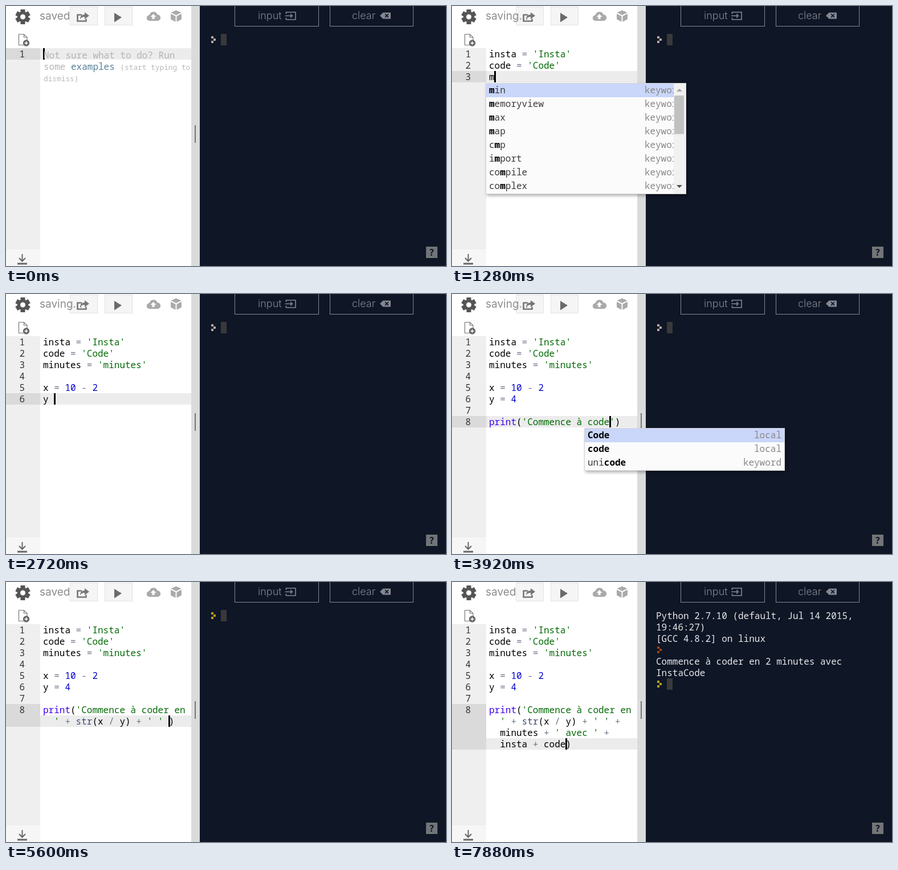
These frames come from a looping animation (772 by 456 pixels, 8 s). An HTML page with a canvas:

```html
<!DOCTYPE html>
<html lang="en">
<head>
<meta charset="utf-8">
<title>Code editor</title>
<style>
  html, body { margin: 0; width: 100%; height: 100%; overflow: hidden; background: #fff; }
  canvas { display: block; }
</style>
</head>
<body>
<canvas id="stage" width="772" height="456"></canvas>
<script>
const ctx = document.getElementById('stage').getContext('2d');
const LOOP = 8000, TICK = 40;
const CHAR = 9.6, LINE = 20, TEXT_X = 65, TOP = 74, WRAP = 27, INDENT = 2;
const MONO = '"Noto Sans Mono", "DejaVu Sans Mono", monospace';
const SANS = 'Inter, Lato, sans-serif';

const KEYS = "insta = 'Insta'\ncode = 'Code'\nminutes = 'minutes'\n\nx = 10 - 2\ny = 4\n\n" +
  "print('Commence à coder en ' + str(x / y) + ' ' + minutes + ' avec ' + insta + code";

// [key index, time it is pressed]; keys in between are evenly spaced
const PACE = [[0, 40], [14, 800], [16, 880], [30, 1280], [31, 1360], [41, 1680], [60, 2480],
  [61, 2600], [63, 2720], [64, 2780], [75, 3360], [76, 3440], [90, 3920], [93, 4080],
  [96, 4280], [108, 5040], [109, 5160], [116, 5560], [117, 5680], [125, 5960], [126, 6080],
  [135, 6600], [136, 6680], [140, 6860], [141, 6920], [151, 7400]];
const RUN = 7480, BANNER = 7560, RESULT = 7640;
const FIRST_POPUP_OVER_PROMPT = 100;

const KEYWORDS = ('zip xrange with while vars unichr type tuple try super str staticmethod sorted ' +
  'slice setattr set round return reversed reload reduce range raise property print pow pass ord ' +
  'or open object not next min memoryview max map long locals list len iter issubclass ' +
  'isinstance is int input in cmp import if id hex help hash globals from frozenset format for ' +
  'float finally filter file execfile exec except eval enumerate else elif divmod dir dict delattr ' +
  'del def continue compile complex coerce classmethod class chr callable bytearray buffer bool ' +
  'bin basestring assert as any and all abs unicode sum lambda raw_input itemgetter __import__').split(' ');

const COLORS = { string: '#036a07', number: '#0000cd', operator: '#687687',
  print: '#3d00f0', str: '#3c4c72', plain: '#000' };

function rect(color, x, y, w, h) {
  ctx.fillStyle = color;
  ctx.fillRect(x, y, w, h);
}
function frame(color, x, y, w, h) {
  ctx.strokeStyle = color;
  ctx.lineWidth = 1;
  ctx.strokeRect(x + .5, y + .5, w - 1, h - 1);
}
function label(text, x, y, color, font) {
  ctx.fillStyle = color;
  ctx.font = font;
  ctx.fillText(text, x, y);
}
const code = (text, x, y, color, size = 16, weight = 400) =>
  label(text, x, y, color, `${weight} ${size}px ${MONO}`);
const fillPath = (d, color) => { ctx.fillStyle = color; ctx.fill(new Path2D(d), 'evenodd'); };
function strokePath(d, color, width) {
  ctx.strokeStyle = color;
  ctx.lineWidth = width;
  ctx.stroke(new Path2D(d));
}

function keysPressed(t) {
  let count = 0;
  for (let i = 0; i < PACE.length; i++) {
    const [key, time] = PACE[i];
    if (t < time) break;
    const [nextKey, nextTime] = PACE[i + 1] || [key + 1, Infinity];
    const share = (t - time) / (nextTime - time);
    count = key + 1 + Math.min(nextKey - key - 1, Math.floor(share * (nextKey - key) + 1e-6));
  }
  return count;
}

// Types the first keys, closing quotes and brackets automatically
function typeKeys(count) {
  let text = '', cursor = 0;
  for (const key of KEYS.slice(0, count)) {
    const closes = "')".includes(key) && text[cursor] === key;
    if (!closes) {
      const pair = { "'": "''", '(': '()' }[key] || key;
      text = text.slice(0, cursor) + pair + text.slice(cursor);
    }
    cursor++;
  }
  return { text, cursor };
}

function wrapLine(line) {
  const rows = [];
  const isMark = c => "'()+-/=".includes(c);
  let start = 0;
  for (;;) {
    const limit = start ? WRAP - INDENT : WRAP;
    if (line.length - start <= limit) break;
    let cut = start + limit;
    while (cut > start && !isMark(line[cut]) && line[cut] !== ' ') cut--;
    while (cut > start && isMark(line[cut])) cut--;
    rows.push({ start, end: ++cut });
    start = cut;
  }
  rows.push({ start, end: line.length });
  return rows;
}

function charColors(line) {
  const colors = [];
  for (const token of line.match(/'[^']*'?|\d+|[-+=\/]|\w+|./g) || []) {
    const kind = token[0] === "'" ? 'string' : /^\d/.test(token) ? 'number'
      : /^[-+=\/]$/.test(token) ? 'operator' : token in COLORS ? token : 'plain';
    for (const _ of token) colors.push(COLORS[kind]);
  }
  return colors;
}

// Positions of the prefix letters inside a word, or null
function fuzzy(word, prefix) {
  const hits = [];
  let from = 0;
  for (const c of prefix.toLowerCase()) {
    const at = word.toLowerCase().indexOf(c, from);
    if (at < 0) return null;
    hits.push(at);
    from = at + 1;
  }
  return hits;
}

function completions(prefix, earlierText) {
  const locals = [...new Set(earlierText.match(/[a-z]+/gi) || [])].reverse();
  return [...locals.map(word => ({ word, meta: 'local' })),
    ...KEYWORDS.map(word => ({ word, meta: 'keyword' }))]
    .map(item => ({ ...item, hits: fuzzy(item.word, prefix) }))
    .filter(item => item.hits)
    .sort((a, b) => a.hits[0] - b.hits[0]);
}

function drawPopup(items, x, row) {
  const shown = items.slice(0, 8), w = 352, h = shown.length * 24 + 3;
  const lineY = TOP + row * LINE;
  const y = row < 8 ? lineY + LINE + 1 : lineY - h - 1;
  x = Math.round(x) - 6;
  ctx.save();
  ctx.shadowColor = 'rgba(0,0,0,.3)';
  ctx.shadowBlur = 5;
  ctx.shadowOffsetX = 2;
  ctx.shadowOffsetY = 3;
  rect('#fbfbfb', x, y, w, h);
  ctx.restore();
  rect('#cad6fa', x + 1, y + 1, w - 2, 24);
  shown.forEach(({ word, meta, hits }, i) => {
    const base = y + 18 + i * 24;
    [...word].forEach((c, k) => hits.includes(k)
      ? code(c, x + 6 + k * CHAR, base, '#000', 16, 700)
      : code(c, x + 6 + k * CHAR, base, '#3a3a3a'));
    code(meta, x + w - 6 - meta.length * CHAR, base, '#888');
  });
  if (items.length > 8) {
    const bar = x + w - 22, track = h - 43;
    rect('#f1f1f1', bar, y + 1, 21, h - 2);
    rect('#c1c1c1', bar + 1, y + 22, 17, Math.max(20, track * 8 / items.length));
    fillPath(`M${bar + 5} ${y + 15}h10l-5-5z`, '#a3a3a3');
    fillPath(`M${bar + 5} ${y + h - 16}h10l-5 5z`, '#505050');
  }
  frame('#d3d3d3', x, y, w, h);
}

function drawToolbar(t) {
  ctx.save();
  ctx.translate(29.5, 19);
  ctx.fillStyle = '#555';
  for (let i = 0; i < 6; i++) {
    ctx.fillRect(-4, -13, 8, 9);
    ctx.rotate(Math.PI / 3);
  }
  ctx.beginPath();
  ctx.arc(0, 0, 9.7, 0, 7);
  ctx.fill();
  ctx.fillStyle = '#fff';
  ctx.beginPath();
  ctx.arc(0, 0, 4.5, 0, 7);
  ctx.fill();
  ctx.restore();

  for (const x of [112, 173]) {
    rect('#f5f5f5', x, 1, 49, 33);
    frame('#e3e3e3', x, 1, 49, 33);
  }
  const saving = (t >= 80 && t < 4680) || (t >= 5800 && t < 7680);
  label(saving ? 'saving...' : 'saved', 59, 24, '#8c8c8c', `400 19px ${SANS}`);

  strokePath('M133 15.5h-7.5v11h15v-4', '#777', 2.6);
  fillPath('M138 11l8 6-8 6v-4c-4 0-6 1-8 4 0-5 3-8 8-8z', '#777');
  fillPath('M190 12l13 8-13 8.5z', '#6b6b6b');
  fillPath('M252 26a5 5 0 0 1-.5-10a7.5 7.5 0 0 1 14.3-1a5.5 5.5 0 0 1-.3 11z' +
    'M256.5 23h4v-4h3l-5-5-5 5h3z', '#aaa');
  fillPath('M298.5 7.5l9 4-9 4.5-9-4.5zM289 13.5l8.5 4.3v10l-8.5-4.5z' +
    'M308 13.5l-8.5 4.3v10l8.5-4.5z', '#aaa');
  strokePath('M32 68.5h-9.5v-19h9l5.5 5.5v5M31.5 49.5v5.5h5.5', '#777', 1.2);
  ctx.fillStyle = '#666';
  ctx.beginPath();
  ctx.arc(35.5, 65, 5.7, 0, 7);
  ctx.fill();
  strokePath('M32.5 65h6M35.5 62v6', '#fff', 1.5);
}

function drawTerminal(t, keyCount) {
  const grey = '#858791';
  rect('#0f1626', 340, 0, 432, 456);
  frame(grey, 401, -2, 148, 38);
  frame(grey, 568, -2, 147, 38);
  label('input', 442, 23, grey, `300 18px ${SANS}`);
  label('clear', 607, 23, grey, `300 18px ${SANS}`);
  strokePath('M491.5 14v-3.3h16.5v13h-16.5v-3.3M490 17.2h12M499 14l3.3 3.2-3.3 3.2', grey, 1.6);
  fillPath('M656 17l5.5-5.5h13.5v11h-13.5zM664.5 14.7l2.3 2.3-2.3 2.3 1.2 1.2 2.3-2.3' +
    ' 2.3 2.3 1.2-1.2-2.3-2.3 2.3-2.3-1.2-1.2-2.3 2.3-2.3-2.3z', grey);

  const prompt = (row, color) => [[360, 53], [364, 57], [360, 61]]
    .forEach(([x, y]) => rect(color, x, y + row * LINE, 4, 4));
  const print = (text, row) => code(text, 358, 65 + row * LINE, '#e6e8ea');
  let row = 0;
  if (t >= BANNER) {
    print('Python 2.7.10 (default, Jul 14 2015,', 0);
    print('19:46:27)', 1);
    print('[GCC 4.8.2] on linux', 2);
    row = 3;
  }
  if (t >= RESULT) {
    prompt(3, '#a0420f');
    print('Commence à coder en 2 minutes avec', 4);
    print('InstaCode', 5);
    row = 6;
  }
  prompt(row, keyCount > FIRST_POPUP_OVER_PROMPT ? '#b3a016' : '#b5aaa3');
  rect('#39393a', 377, 49 + row * LINE, 10, 20);

  rect('#737477', 737, 422, 20, 20);
  code('?', 742, 438, '#0f1626', 16, 600);
}

function drawEditor(t, keyCount) {
  const { text, cursor } = typeKeys(keyCount);
  const before = text.slice(0, cursor).split('\n');
  const lines = text.split('\n');
  const active = before.length - 1, cursorCol = before[active].length;
  const place = (rows, col) => {
    const index = rows.findLastIndex(r => r.start <= col);
    return { index, x: TEXT_X + (col - rows[index].start + (index ? INDENT : 0)) * CHAR };
  };

  rect('#efefef', 0, TOP, 60, 353);
  rect('#f6f6f6', 0, 427, 60, 29);
  strokePath('M28.5 435v12M23 442l5.5 5.5 5.5-5.5', '#666', 2);
  rect('#666', 20, 450.5, 17, 3);
  rect('#dadcdb', 325, 0, 15, 456);
  rect('#777', 331, 209, 2, 31);

  let visualRow = 0, popup = null;
  lines.forEach((line, n) => {
    const rows = wrapLine(line), colors = charColors(line);
    const y = TOP + visualRow * LINE;
    const caret = n === active && place(rows, cursorCol);
    if (caret) {
      rect('#dadada', 0, y, 60, rows.length * LINE);
      rect('#ececec', 60, y + caret.index * LINE, 265, LINE);
    }
    code(String(n + 1), 23.5, y + 16, '#333');
    rows.forEach(({ start, end }, r) => {
      for (let i = start; i < end; i++) {
        code(line[i], TEXT_X + (i - start + (r ? INDENT : 0)) * CHAR, y + 16 + r * LINE, colors[i]);
      }
    });
    if (caret) {
      if (t < 7800 || t >= 7880) rect('#000', Math.floor(caret.x), y + caret.index * LINE, 3, LINE);
      const prefix = (before[n].match(/[a-z]+$/i) || [''])[0];
      if (prefix && t < RUN) {
        const items = completions(prefix, lines.slice(0, n).join(' '));
        const spot = place(rows, cursorCol - prefix.length);
        if (items.length) popup = [items, spot.x, visualRow + spot.index];
      }
    }
    visualRow += rows.length;
  });

  if (!text) {
    code('Not sure what to do? Run', 66, 92, '#b3b3b3');
    code('some', 66, 112, '#b3b3b3');
    code('examples', 114, 112, '#568299');
    code('(start typing to', 200.4, 112, '#b8b8b8', 12.8);
    code('dismiss)', 66, 132, '#b8b8b8', 12.8);
  }
  return popup;
}

let origin;
function draw(now) {
  origin ??= now;
  const t = Math.floor(((now - origin) % LOOP) / TICK) * TICK;
  const keyCount = keysPressed(t);
  rect('#fff', 0, 0, 772, 456);
  const popup = drawEditor(t, keyCount);
  drawToolbar(t);
  drawTerminal(t, keyCount);
  if (popup) drawPopup(...popup);
  requestAnimationFrame(draw);
}
requestAnimationFrame(draw);
</script>
</body>
</html>
```
